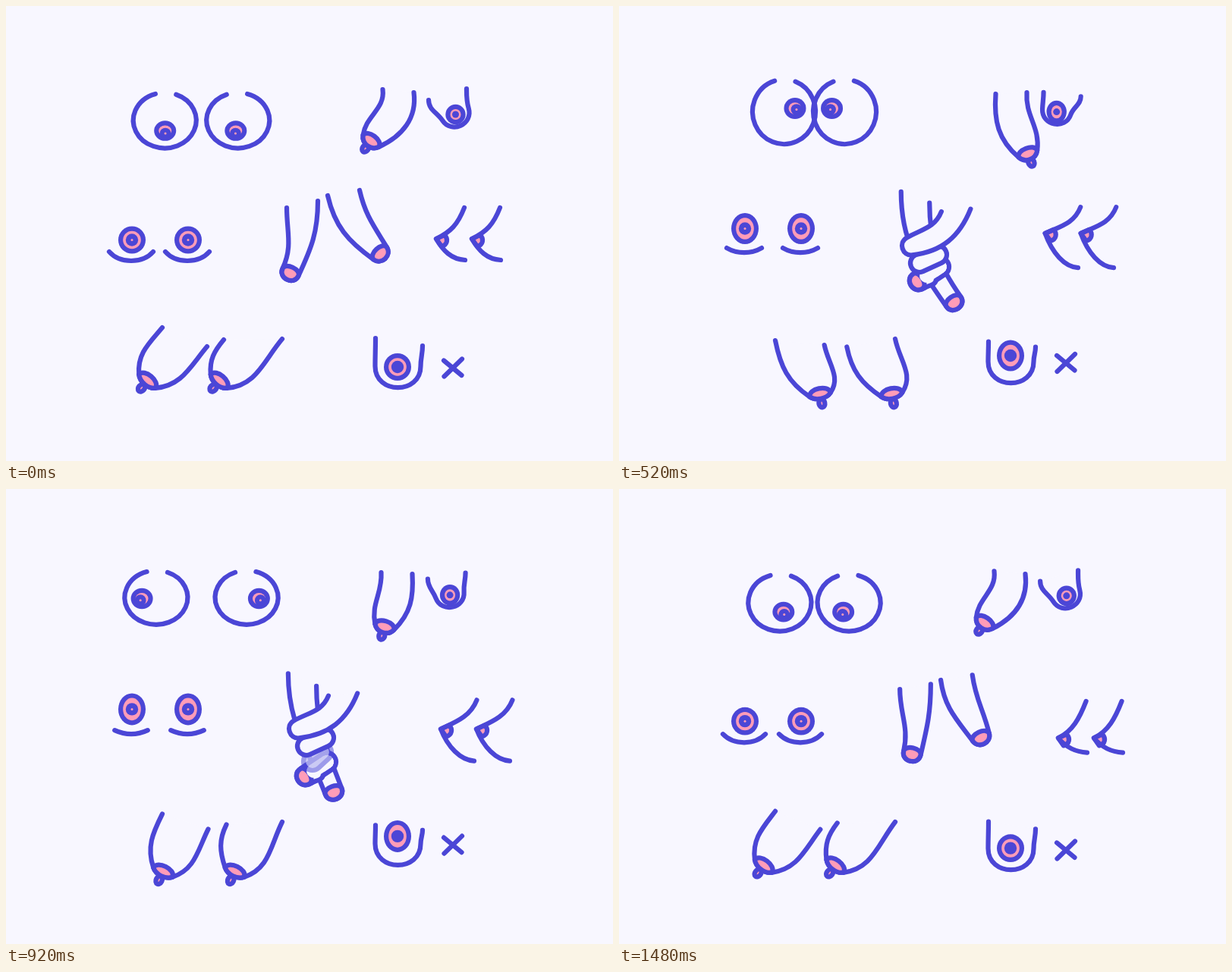
These frames come from a looping animation (800x600 px, 1520 ms). An HTML page with a canvas:

```html
<!DOCTYPE html>
<html lang="en">
<head>
<meta charset="utf-8">
<title>Bounce</title>
<style>
  html, body { margin: 0; width: 100%; height: 100%; overflow: hidden; background: #f8f7ff; }
  canvas { display: block; width: 800px; height: 600px; }
</style>
</head>
<body>
<canvas id="stage" width="800" height="600"></canvas>
<script>
const ctx = document.getElementById('stage').getContext('2d');
const BLUE = '#4b46d6', PINK = '#ff9cb8', PAPER = '#f8f7ff';
const LOOP = 1520, HALF = 760, STEP = 40, LINE = 6.2;
const { PI, sin, cos, hypot, min, max } = Math;
const RAD = PI / 180;
ctx.lineCap = ctx.lineJoin = 'round';

// ---- timing ----

// 0 -> 1 -> 0 over half a loop, turning at peak
function sway(t, peak) {
  const u = t % HALF;
  return u < peak
    ? (1 - cos(PI * u / peak)) / 2
    : (1 + cos(PI * (u - peak) / (HALF - peak))) / 2;
}

// Angle that turns twice in half a loop
function hopAngle(t) {
  const u = t % HALF;
  return 2 * PI * (u < 400 ? u / 400 : (u - 400) / 360);
}

const hop = t => (1 - cos(hopAngle(t))) / 2;

// Straight steps between rows of [position, ...values]
function along(rows, q) {
  let i = 0;
  while (i < rows.length - 2 && q > rows[i + 1][0]) i++;
  const [a, b] = [rows[i], rows[i + 1]];
  const u = max(0, min(1, (q - a[0]) / (b[0] - a[0])));
  return a.slice(1).map((v, k) => v + (b[k + 1] - v) * u);
}

// ---- drawing helpers ----

function outline(fill, width = LINE) {
  if (fill) { ctx.fillStyle = fill; ctx.fill(); }
  ctx.strokeStyle = BLUE;
  ctx.lineWidth = width;
  ctx.stroke();
}

function oval(x, y, rx, ry, fill) {
  ctx.beginPath();
  ctx.ellipse(x, y, rx, ry, 0, 0, 2 * PI);
  ctx.fillStyle = fill;
  ctx.fill();
}

function rings(x, y, rx, ry, core, dot = 0) {
  oval(x, y, rx, ry, BLUE);
  oval(x, y, rx - LINE, ry - LINE, PINK);
  oval(x, y, core, core, BLUE);
  oval(x, y, dot, dot, PINK);
}

function shifted(x, y, draw) {
  ctx.save();
  ctx.translate(x, y);
  draw();
  ctx.restore();
}

function faded(alpha, draw) {
  if (alpha <= 0) return;
  ctx.globalAlpha = min(1, alpha);
  draw();
  ctx.globalAlpha = 1;
}

const move = ([x, y], [dx, dy], k) => [x + dx * k, y + dy * k];
const bend = (p, q, r) => ctx.bezierCurveTo(...p, ...q, ...r);
const heading = deg => [sin(deg * RAD), cos(deg * RAD)];

// Soft tube hanging from two ends; flare opens its sides into a bowl
function limb({ a, b, tip, turn, w, flare = 0, lean = 0, lens = 1, nub = 0 }) {
  const d = heading(turn), n = [d[1], -d[0]];
  const left = move(tip, n, -w), right = move(tip, n, w);
  const flow = side => move([d[0] * cos(flare), d[1] * cos(flare)], n, side * sin(flare));
  const inward = flow(1), back = flow(-1), down = heading(turn * lean);
  const curl = w * (1.25 - 0.7 * flare);
  const reachA = 0.4 * hypot(a[0] - left[0], a[1] - left[1]);
  const reachB = 0.4 * hypot(b[0] - right[0], b[1] - right[1]);
  const cap = () => bend(move(left, inward, curl), move(right, back, curl), right);

  if (nub) {
    ctx.beginPath();
    ctx.ellipse(...move(tip, d, nub), 4, 5.5, -turn * RAD, 0, 2 * PI);
    outline(PINK);
  }
  ctx.beginPath();
  ctx.moveTo(...a);
  bend(move(a, down, reachA), move(left, inward, -reachA), left);
  cap();
  bend(move(right, back, -reachB), move(b, down, reachB), b);
  outline(PAPER);

  faded(lens, () => {
    ctx.beginPath();
    ctx.moveTo(...left);
    cap();
    bend(move(right, d, -0.8 * w), move(left, d, -0.8 * w), left);
    outline(PINK);
  });
}

// ---- the seven figures ----

function drawRound(t) {
  const p = 2 * PI * t / HALF;
  const turn = p + (8 - 18 * cos(p) - 6 * sin(p)) * RAD;
  const s = sin(turn), c = cos(turn);
  const one = gap => {
    ctx.beginPath();
    ctx.ellipse(207.5 - 10 * s, 140 + 11 * c, 41.5, 39.5 - 3.5 * c - 3 * s, 0, -1.2, 4.41);
    outline();
    const x = 205 - 27 * s + gap, y = 136.5 + 28.5 * c;
    oval(x, y, 14.5, 14 - 0.8 * c, BLUE);
    oval(x, y, 8.4, 7.8 - 0.8 * c, PINK);
    const cx = x - 2 * s, cy = y + 1.6 + 1.9 * c;
    oval(cx, cy, 7.4, 7.4, BLUE);
    oval(cx, cy, 1.5, 1.5, PINK);
  };
  one(0);
  ctx.save();
  ctx.translate(515, 0);
  ctx.scale(-1, 1);
  one(2.5);
  ctx.restore();
}

function drawUneven(t) {
  const e = sway(t, 440);
  limb({
    a: [496.5, 110 + 7 * e], b: [537.5, 114], tip: [481 + 68 * e, 178 + 20 * e],
    turn: -37 + 68 * e, w: 13, flare: 0.5, lean: -0.2, nub: 12
  });
  const x = 592.5 - 18.5 * e, y = 143 - 4 * e;
  limb({
    a: [557 + 3 * e, 124 - 12 * e], b: [607 + 2 * e, 109 + 12 * e], tip: [x, y],
    turn: 25 - 42 * e, w: 19, flare: 0.15, lens: 0
  });
  rings(x, y, 13.2, 13.2 + 2 * e, 4.5);
}

function drawSmiles(t) {
  const h = hop(t), in_ = 8 * h, y = 324 - 6.5 * h, sag = y + 16 - 10.5 * h;
  for (const dx of [0, 74]) shifted(dx, 0, () => {
    ctx.beginPath();
    ctx.moveTo(136 + in_, y);
    bend([150 + in_, sag], [180 - in_, sag], [194 - in_, y]);
    outline();
    rings(166, 308.5 - 20 * h, 18, 18 + 3.3 * h, 8.2, 1.5);
  });
}

function drawCup(t) {
  const h = hop(t);
  limb({
    a: [487, 438 + 6 * h], b: [549, 448 + 2 * h], tip: [516.5, 475 - 8 * h],
    turn: 0, w: 30, lens: 0
  });
  rings(516, 476 - 20 * h, 18, 18 + 3.3 * h, 8.2);
  const y = 477 - 8.7 * h;
  ctx.beginPath();
  ctx.moveTo(577, y - 9.5);
  ctx.lineTo(600.5, y + 10);
  ctx.moveTo(601, y - 11.5);
  ctx.lineTo(577.5, y + 11.5);
  outline();
}

function drawSide(t) {
  const p = hopAngle(t), wave = (mid, c, s) => mid + c * cos(p) + s * sin(p);
  const top = [wave(606, -2, 1.4), wave(267, -1, -2.6)];
  const tip = [wave(564, 3, -1), wave(310, -3, -13.5)];
  const end = [605, wave(341, -6, 1.2)];
  const from = (o, x, y) => [o[0] + x, o[1] + y];
  for (const dx of [0, 47]) shifted(dx, 0, () => {
    ctx.beginPath();
    ctx.moveTo(...tip);
    ctx.lineTo(...from(tip, 11, -5));
    bend(from(tip, 16, 0), from(tip, 15, 8), from(tip, 7, 10));
    ctx.closePath();
    outline(PINK);
    ctx.beginPath();
    ctx.moveTo(...top);
    bend(from(top, -8.5, 22), from(tip, 19, -9), tip);
    bend(from(tip, 9, 0.56 * (end[1] - tip[1])), from(end, -18, -1), end);
    outline();
  });
}

function drawHanging(t) {
  const e = 2 * sway(t, 480);
  const body = {
    tip: [186 + 41.6 * e, 514 - 8.5 * (e - 1.5) ** 2],
    turn: -40 + 27 * e, w: 14, flare: PI / 4, lean: 1, nub: 11.5
  };
  limb({ ...body, a: [206, 424 + 9 * e], b: [265 + 3 * e, 449 - e] });
  limb({
    ...body, a: [287 + 7 * e, 440 + 5 * e], b: [364, 439],
    tip: move(body.tip, [1, 0], 94.5)
  });
}

// Tip x, y and heading as the twist tightens from 0 to 1
const BACK = [
  [0, 375, 351, -25], [0.48, 441, 335, 44], [0.61, 432, 341, 40],
  [0.79, 435, 377, 28], [0.88, 441, 390, 35], [1, 424, 406, 9]
];
const FRONT = [[0, 493, 326, 43], [0.48, 400, 333, -59], [0.61, 387, 317, -76], [0.79, 383, 317, -72]];
const TAIL = [[0.7, 340], [0.88, 362], [1, 391]];

// One turn of the coil: a hollow capsule
function coil(x1, y1, x2, y2) {
  for (const [color, width] of [[BLUE, 24 + LINE], [PAPER, 24 - LINE]]) {
    ctx.beginPath();
    ctx.moveTo(x1, y1);
    ctx.lineTo(x2, y2);
    ctx.strokeStyle = color;
    ctx.lineWidth = width;
    ctx.stroke();
  }
}

function drawTwist(t) {
  const q = sin(PI * t / LOOP);
  const [bx, by, backTurn] = along(BACK, q);
  const [fx, fy, frontTurn] = along(FRONT, q);
  const [y] = along(TAIL, q);
  limb({ a: [370 + 2 * q, 266 - 24 * q], b: [411 - 2 * q, 257 + 3 * q], tip: [bx, by], turn: backTurn, w: 11.5 });
  faded((q - 0.78) / 0.07, () => {
    coil(396, y, 423, y - 18);
    limb({ a: [410, y - 12], b: [418, y - 2], tip: [394, y + 1], turn: -58, w: 11.5 });
    ctx.beginPath();
    ctx.moveTo(405, y - 6);
    ctx.lineTo(423, y - 18);
    ctx.strokeStyle = PAPER;
    ctx.lineWidth = 24 - LINE;
    ctx.stroke();
  });
  faded((q - 0.92) / 0.05, () => coil(404, 359, 417, 347));
  faded((q - 0.64) / 0.1, () => coil(396, 339, 420, 328));
  limb({
    a: [424 + q, 250 + 24 * q], b: [466 - 3 * q, 243 + 28 * q], tip: [fx, fy],
    turn: frontTurn, w: 12, flare: 0.2, lean: 0.3, lens: (0.63 - q) / 0.12
  });
}

function draw(t) {
  const late = t >= HALF;
  ctx.fillStyle = PAPER;
  ctx.fillRect(0, 0, 800, 600);
  drawRound(t);
  shifted(late ? -2 : 0, late ? -2 : 0, () => drawUneven(t));
  drawSmiles(t);
  drawTwist(t);
  shifted(late ? 12 : 0, late ? 12 : 0, () => drawSide(t));
  drawHanging(t);
  drawCup(t);
}

const start = performance.now();
function tick() {
  const t = (performance.now() - start) % LOOP;
  draw(max(0, Math.floor(t / STEP) * STEP));
  requestAnimationFrame(tick);
}
tick();
</script>
</body>
</html>
```
